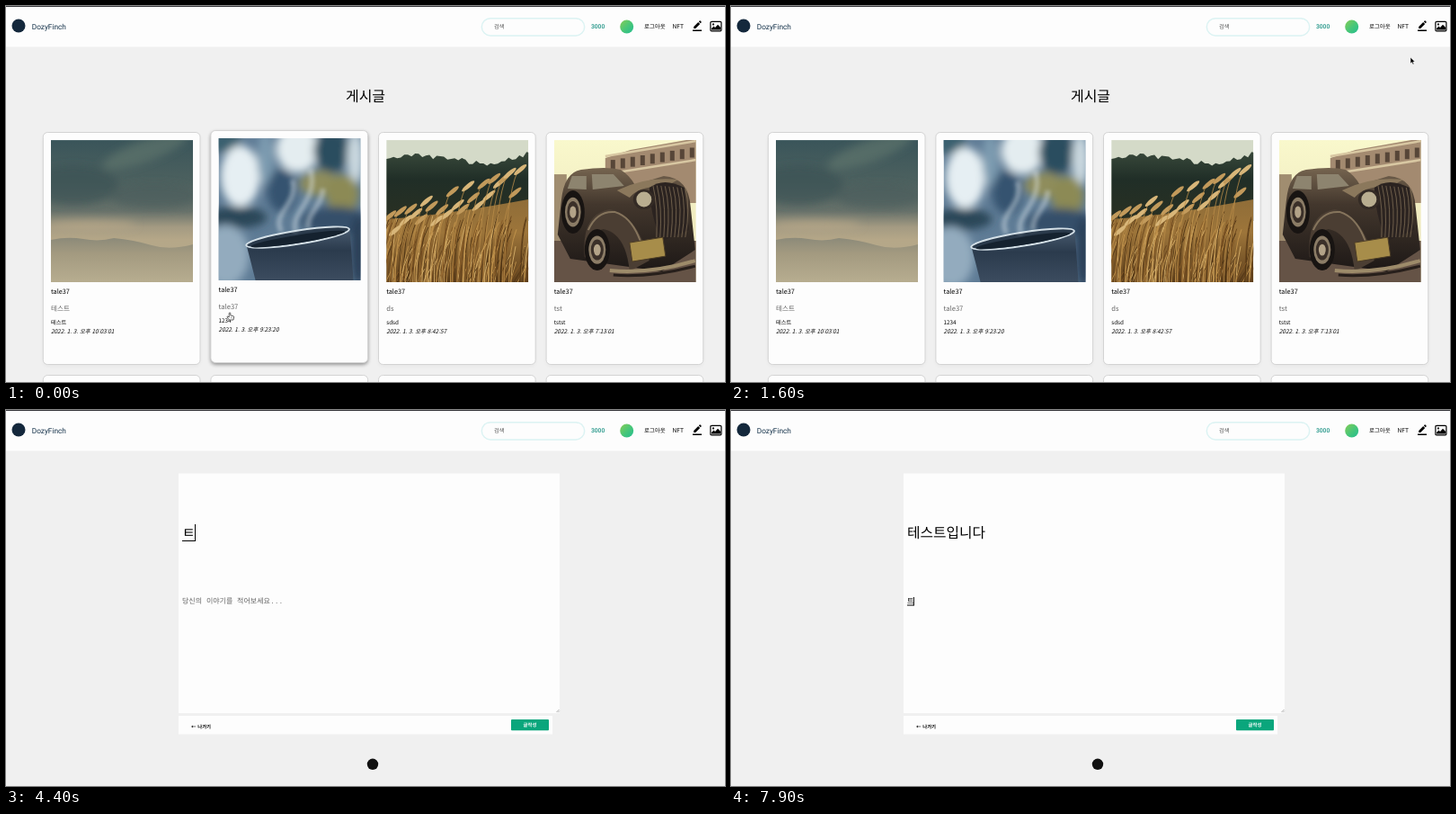
Recreate the animation shown at these times as an HTML page. Size 800 px wide and 418 px high, loop 8000 ms.

```html
<!DOCTYPE html>
<html lang="ko">
<head>
<meta charset="utf-8">
<style>
html, body { margin: 0; height: 100%; overflow: hidden; background: #f0f0f0; }
svg { display: block; width: 800px; height: 418px; }
text { font-family: "Noto Sans CJK KR", "Noto Sans CJK", sans-serif; white-space: pre; text-rendering: geometricPrecision; }
.latin { font-family: Roboto, sans-serif; }
.mono { font-family: "Noto Sans Mono", "Noto Sans CJK KR", monospace; }
</style>
</head>
<body>
<svg id="stage" viewBox="0 0 800 418"></svg>
<script>
const LOOP = 8000, STEP = 100;
const TITLE_SIZE = 15.75, BODY_SIZE = 8, HANGUL = 0.92;
const CARD_W = 174.7, CARD_H = 258, PHOTO = 158;
const cardX = i => 41.3 + i * 186.6;

const text = (x, y, size, str, attrs = '') =>
  `<text x="${x}" y="${y}" font-size="${size}" ${attrs}>${str}</text>`;
const rect = (x, y, w, h, fill, attrs = '') =>
  `<rect x="${x}" y="${y}" width="${w}" height="${h}" fill="${fill}" ${attrs}/>`;
const path = (d, fill, attrs = '') => `<path d="${d}" fill="${fill}" ${attrs}/>`;
const line = (d, stroke, width, attrs = '') =>
  path(d, 'none', `stroke="${stroke}" stroke-width="${width}" ${attrs}`);
const oval = (x, y, rx, ry, fill, attrs = '') =>
  `<ellipse cx="${x}" cy="${y}" rx="${rx}" ry="${ry}" fill="${fill}" ${attrs}/>`;
const gradient = (id, stops, dir = 'x2="0" y2="1"') =>
  `<linearGradient id="${id}" ${dir}>${stops.map(([at, c]) =>
    `<stop offset="${at}" stop-color="${c}"/>`).join('')}</linearGradient>`;
const random = n => { const v = Math.sin(n * 127.1 + 31.7) * 43758.5453; return v - Math.floor(v); };

const defs = `<defs>
  ${gradient('dusk', [[0, '#3a555a'], [.3, '#4d615f'], [.5, '#67716a'], [.61, '#a39a82'], [.7, '#b5a788'], [1, '#b5ab8e']])}
  ${gradient('haze', [[0, '#8c8a79'], [.35, '#a39a80'], [1, '#b7ad90']])}
  ${gradient('cup', [[0, '#46586c'], [.4, '#2b3b4d'], [1, '#3c4c5f']])}
  ${gradient('woods', [[0, '#38483a'], [.4, '#202e27'], [1, '#2a3022']])}
  ${gradient('field', [[0, '#8f6d38'], [.4, '#9d753a'], [1, '#5f401c']])}
  ${gradient('sky', [[0, '#f9f8cc'], [1, '#e9e1b6']])}
  ${gradient('metal', [[0, '#75644f'], [.35, '#43372d'], [1, '#1d1816']])}
  ${gradient('avatar', [[0, '#86cc55'], [.5, '#4bc777'], [1, '#22bd91']], 'x2="1" y2="1"')}
  <filter id="soft" x="-50%" y="-50%" width="200%" height="200%"><feGaussianBlur stdDeviation="5"/></filter>
  <filter id="blur" x="-50%" y="-50%" width="200%" height="200%"><feGaussianBlur stdDeviation="2.2"/></filter>
  <clipPath id="frame"><rect width="${PHOTO}" height="${PHOTO}"/></clipPath>
</defs>`;

function stormPhoto() {
  return rect(0, 0, PHOTO, PHOTO, 'url(#dusk)') +
    `<g filter="url(#soft)">` +
    oval(105, 12, 50, 12, '#64796f', 'opacity=".6" transform="rotate(-20 105 12)"') +
    oval(25, 50, 50, 22, '#3a5053', 'opacity=".6"') +
    oval(115, 62, 50, 14, '#4a5c5a', 'opacity=".6"') +
    oval(45, 94, 50, 5, '#bfac8a', 'opacity=".6"') + '</g>' +
    path('M0 111Q18 107 36 110T70 109Q92 111 112 117T158 116V158H0Z', 'url(#haze)');
}

function cupPhoto() {
  const steam = ['M70 104C58 82 90 74 82 46', 'M86 104C78 82 112 70 102 34', 'M100 100C96 86 116 74 116 56'];
  return rect(0, 0, PHOTO, PHOTO, '#5f7c96') + `<g filter="url(#soft)">` +
    oval(5, 2, 20, 14, '#3a6070') + oval(24, 42, 22, 34, '#e6eff3') + oval(52, 22, 9, 30, '#7d9bb0') +
    oval(88, 12, 24, 26, '#e4edf0') + oval(126, 14, 20, 24, '#2a4d5e') + oval(152, 22, 9, 30, '#cbd9e0') +
    oval(70, 58, 16, 24, '#35536f') + oval(112, 50, 22, 14, '#8f8d5c') + oval(138, 62, 18, 22, '#8c8a55') +
    oval(20, 88, 34, 12, '#2c4658') + oval(130, 92, 38, 16, '#34506b') + oval(156, 125, 10, 40, '#2c4158') +
    oval(8, 130, 26, 34, '#93abbe') + '</g>' +
    path('M31 119Q36 138 41 158H150L146 102Z', 'url(#cup)') +
    `<g transform="rotate(-9 88 110)">` +
    oval(88, 110, 58, 7.5, '#2a3a4b', 'stroke="#d5e1e8" stroke-width="2"') +
    oval(88, 112, 53, 4.5, '#15222f') + '</g>' +
    `<g filter="url(#blur)" opacity=".4">` + steam.map(d => line(d, '#e2ebef', 6)).join('') + '</g>';
}

function wheatPhoto() {
  let trees = 'M0 90', stalks = '', heads = '';
  for (let x = 0; x <= PHOTO + 3; x += 4)
    trees += `L${x} ${(20 - 5 * Math.sin(x / 23) - x * .03 + random(x) * 7).toFixed(1)}`;
  for (let i = 0; i < 190; i++) {
    const x = random(i) * 180 - 15, y = 78 + random(i + 200) * 70, lean = 4 + random(i + 400) * 10;
    const color = ['#c4964d', '#6b471d', '#d9b26b', '#875c28', '#4f3415'][i % 5];
    stalks += line(`M${x.toFixed(1)} 160Q${x.toFixed(1)} ${(y + 20).toFixed(1)} ${(x + lean).toFixed(1)} ${y.toFixed(1)}`, color, .9);
  }
  // Ears follow the slope of the field, higher to the right
  for (let i = 0; i < 26; i++) {
    const x = 8 + i * 5.8, y = 92 - x * .3 + (random(i + 600) - .6) * 30;
    heads += line(`M${x - 22} 158Q${x - 20} ${y + 34} ${x - 7} ${y + 6}`, '#b98c48', .8) +
      oval(x - 4, y + 4, 9, 2.4, i % 2 ? '#d8b679' : '#c29a5b', `transform="rotate(-40 ${x - 4} ${y + 4})"`);
  }
  return rect(0, 0, PHOTO, PHOTO, '#d4dac8') + path(trees + 'V90Z', 'url(#woods)') +
    path('M0 88Q60 84 158 66V158H0Z', 'url(#field)') + stalks + heads;
}

function carPhoto() {
  let windows = '', grille = '';
  for (let i = 0; i < 9; i++) windows += rect(63 + i * 11, 22 - i * 1.7, 5, 11, '#574638');
  for (let i = 0; i < 9; i++) grille += line(`M${110 + i * 4.5} ${50 + i * .4}Q${116 + i * 4.5} 75 ${114 + i * 4} 108`, '#8a775c', .7);
  const wheel = (x, y, rx, ry) => oval(x, y, rx, ry, '#181412') +
    oval(x, y, rx * .68, ry * .68, '#8b7c66') + oval(x, y, rx * .5, ry * .5, '#3b3029') +
    oval(x, y, rx * .28, ry * .28, '#b3a388');
  return rect(0, 0, PHOTO, PHOTO, 'url(#sky)') +
    path('M57 20L85 11 158 -2V70H57Z', '#a38a70') + line('M57 18L158 1M57 38L158 22', '#d8c7a2', 2.5) + windows +
    rect(0, 38, 14, 80, '#a08d70') + path('M0 112H158V158H0Z', '#655346') +
    path('M8 68Q11 36 30 33 58 29 74 33 84 39 90 50L122 40Q150 42 152 75L157 122 120 146 18 132 4 105Z', 'url(#metal)') +
    path('M15 54L20 40H36V55ZM42 38H66L78 51 43 55Z', '#8d846f') +
    path('M70 56Q102 40 138 44L124 52Q96 50 84 64Z', '#8b785c') +
    path('M106 53Q122 41 145 53L150 100 121 112Q108 91 106 53Z', '#2b2320') + grille +
    wheel(21, 80, 13, 24) +
    path('M34 130Q30 82 62 77 92 82 106 134L84 146Q80 104 55 99 38 102 38 133Z', '#4b3e33') +
    line('M38 100Q48 78 68 80 88 86 98 118', '#85745c', 2) +
    wheel(48, 122, 14, 23) + oval(100, 66, 12, 11, '#342b25') + oval(100, 66, 8.5, 8.5, '#b9ae90') +
    line('M62 145Q108 149 157 134', '#9d8b6a', 4) + line('M66 150Q108 153 157 140', '#271f1b', 3) +
    path('M84 114L121 108 124 129 87 135Z', '#a78d4a', 'stroke="#4c3d25"');
}

const posts = [
  { photo: stormPhoto, heading: '테스트', body: '테스트', time: '10:03:01' },
  { photo: cupPhoto, heading: 'tale37', body: '1234', time: '9:23:20' },
  { photo: wheatPhoto, heading: 'ds', body: 'sdsd', time: '8:42:57' },
  { photo: carPhoto, heading: 'tst', body: 'tstst', time: '7:13:01' },
];

const cardBox = rect(0, 0, CARD_W, CARD_H, '#fdfdfd', 'rx="5" stroke="#d3d3d3"');
const card = (post, i) => `<g id="card${i}">
  ${rect(0, 2, CARD_W, CARD_H, '#000', `id="shadow${i}" rx="5" filter="url(#blur)"`)}${cardBox}
  <g transform="translate(8.7 8.6)" clip-path="url(#frame)">${post.photo()}</g>
  ${text(8.7, 179.5, 7.3, 'tale37', 'font-weight="500"')}
  ${text(8.7, 198.2, 7.6, post.heading, 'fill="#666"')}
  ${text(8.7, 213.2, 6.3, post.body, 'font-weight="500"')}
  ${text(8.7, 223.2, 6.4, '2022. 1. 3. 오후 ' + post.time, 'font-style="italic" font-weight="500"')}
</g>`;

const header = rect(0, 0, 800, 45.5, '#fdfdfd') + rect(0, 0, 800, 1, '#39393d') +
  oval(14, 22, 7.5, 7.5, '#14283c') +
  text(28.7, 26.2, 8.3, 'DozyFinch', 'class="latin" fill="#15324a"') +
  rect(529.3, 13.7, 114.4, 19.2, '#fdfdfd', 'rx="9.6" stroke="#dcf3f3" stroke-width="1.5"') +
  text(543, 25.3, 6.2, '검색', 'fill="#555"') +
  text(651, 25.4, 6.7, '3000', 'class="latin" fill="#168f80" font-weight="500"') +
  oval(690.7, 23, 7.5, 7.5, 'url(#avatar)') +
  text(710, 25.4, 6.4, '로그아웃', 'font-weight="500"') +
  text(741.5, 25.4, 6.7, 'NFT', 'font-weight="500"') +
  path('M764 26.4H774V27.9H764ZM765.2 22.9L770.2 17.9 772.2 19.9 767.2 24.9H765.2ZM770.8 17.3L771.7 16.4Q772.2 16.1 772.7 16.5L773.6 17.4Q773.9 17.9 773.5 18.4L772.8 19.3Z', '#000', 'id="pencil"') +
  rect(783.9, 17.3, 12, 10.6, 'none', 'rx="1.2" stroke="#000" stroke-width="1.2"') +
  oval(787, 20.4, 1.1, 1.1, '#000') + path('M785 26.5V25L787.5 22.6 789 24 792 20.8 795 23.8V26.5Z', '#000');

const board = text(400, 106, 16, '게시글', 'text-anchor="middle"') +
  posts.map((post, i) => `<g transform="translate(${cardX(i)} 140.5)">${card(post, i)}</g>` +
    `<g transform="translate(${cardX(i)} 410.5)">${cardBox}</g>`).join('');

const field = (id, y, size, cls) => text(196, y, size, '', `id="${id}" class="${cls}"`) + line('', '#000', 1, `id="${id}Marks"`);
const editor = rect(192, 70.5, 424, 266.5, '#fdfdfd') +
  line('M612.5 336L615.5 333M614.3 336.2L615.7 334.8', '#777', .6) +
  rect(192, 340, 416, 20.5, '#fdfdfd') +
  text(206, 354, 5.4, '←', 'font-weight="700"') + text(213.2, 354, 5.4, '나가기', 'font-weight="700"') +
  rect(562, 344, 42, 12.2, '#0aa67c', 'rx="1"') +
  text(583, 352, 5.4, '글작성', 'fill="#fff" font-weight="700" text-anchor="middle"') +
  oval(408, 393.8, 6.2, 6.2, '#111') + field('title', 142, TITLE_SIZE, '') + field('body', 215.3, BODY_SIZE, 'mono');

const cursors = {
  arrow: path('M0 0V7L1.6 5.6 2.7 8 3.9 7.5 2.8 5.1H5Z', '#000', 'stroke="#fff" stroke-width=".5"'),
  hand: path('M-.8 .3Q0-.5 .8 .3V3L4 3.7Q4.8 4 4.6 5L4 8H-.5L-3 5Q-3.2 4 -2.2 4.1L-.8 5Z', '#fff', 'stroke="#222" stroke-width=".7"') +
    line('M1.3 4.6V6.4M2.7 4.8V6.4', '#333', .4),
  beam: line('M-1.5-4.5Q0-4.5 0-3.5Q0-4.5 1.5-4.5M0-3.5V3.5M-1.5 4.5Q0 4.5 0 3.5Q0 4.5 1.5 4.5', '#222', .7),
};

const stage = document.getElementById('stage');
stage.innerHTML = defs + rect(0, 0, 800, 418, '#f0f0f0') + header +
  `<g id="board">${board}</g><g id="editor">${editor}</g>
  <g id="status">${path('M0 409H264Q266 409 266 411V418H0Z', '#35363a')}
  ${text(1.5, 415.8, 5.4, 'localhost:3000/create', 'class="latin" fill="#d4d5d7"')}</g>
  <g id="cursor">${Object.keys(cursors).map(k => `<g id="${k}">${cursors[k]}</g>`).join('')}</g>`;
const el = id => document.getElementById(id);
const show = (id, on) => el(id).setAttribute('visibility', on ? 'inherit' : 'hidden');

// Pointer stops: time, x, y
const stops = [[0, 249, 341], [1000, 678, 70], [1600, 756, 57], [1800, 766, 50], [1950, 767.5, 23],
  [3150, 767.5, 23], [3600, 693, 50], [4000, 344, 137], [6800, 344, 137], [6900, 320, 160], [7300, 302, 213]];

function pointer(t) {
  const next = stops.findIndex(s => s[0] > t);
  if (next < 1) return (next ? stops[stops.length - 1] : stops[0]).slice(1);
  const [t0, x0, y0] = stops[next - 1], [t1, x1, y1] = stops[next];
  const p = (t - t0) / (t1 - t0), e = p * p * (3 - 2 * p);
  return [x0 + (x1 - x0) * e, y0 + (y1 - y0) * e];
}

const inside = ([x, y], left, top, w, h) => x >= left && x <= left + w && y >= top && y <= top + h;
const overCard = (p, i) => inside(p, cardX(i), 140, CARD_W, CARD_H);

// Average hover over the transition window
function lift(t, i) {
  let sum = 0;
  for (let k = 0; k < 5; k++) sum += overCard(pointer(Math.max(0, t - k * 50)), i);
  return sum / 5;
}

const titleKeys = [[4000, ''], [4400, 'ㅌ'], [5000, '테'], [5200, '테ㅅ'], [5300, '테스'], [5400, '테스ㅌ'], [5500, '테스트'],
  [5900, '테스트ㅇ'], [6000, '테스트이'], [6100, '테스트입'], [6200, '테스트입ㄴ'], [6300, '테스트입니'], [6400, '테스트입니다']];
const bodyKeys = [[7300, ''], [7800, 'ㅌ'], [7900, '트']];

function drawField(id, keys, t, hint, size, top, bottom, blurAt) {
  const [since, typed] = keys.filter(k => k[0] <= t).pop() || [Infinity, ''];
  el(id).textContent = typed || hint;
  el(id).setAttribute('fill', typed ? '#000' : '#666');
  const advance = size * HANGUL, end = 196 + typed.length * advance;
  let marks = '';
  if (t >= since && t < blurAt) {
    if (t - since < 500) marks += `M${end} ${top}V${bottom}`;
    if (typed) marks += `M${end - advance} ${bottom - .5}H${end}`;
  }
  el(id + 'Marks').setAttribute('d', marks);
}

function render(t) {
  const editing = t >= 2800, p = pointer(t);
  show('board', !editing);
  show('editor', editing);
  posts.forEach((_, i) => {
    const up = editing ? 0 : lift(t, i);
    el('card' + i).setAttribute('transform', `translate(0 ${-2 * up})`);
    el('shadow' + i).setAttribute('opacity', .04 + .4 * up);
  });

  const onPencil = inside(p, 762, 14, 14, 16);
  el('pencil').setAttribute('fill', onPencil ? '#0ca678' : '#000');
  const onLink = onPencil || !editing && posts.some((_, i) => overCard(p, i));
  const kind = onLink ? 'hand' : editing && inside(p, 192, 70, 424, 267) ? 'beam' : 'arrow';
  Object.keys(cursors).forEach(k => show(k, k === kind));
  show('cursor', !(t >= 4400 && t < 6900 || t >= 7800));
  el('cursor').setAttribute('transform', `translate(${p[0]} ${p[1]})`);

  el('status').setAttribute('opacity', t < 2600 ? 0 : Math.max(0, Math.min(1, (3900 - t) / 300)));
  drawField('title', titleKeys, t, '제목', TITLE_SIZE, 127, 146, 7300);
  drawField('body', bodyKeys, t, '당신의 이야기를 적어보세요...', BODY_SIZE, 208, 217.5, LOOP);
}

function tick() {
  render(Math.floor(performance.now() % LOOP / STEP) * STEP);
  requestAnimationFrame(tick);
}
tick();
</script>
</body>
</html>
```
